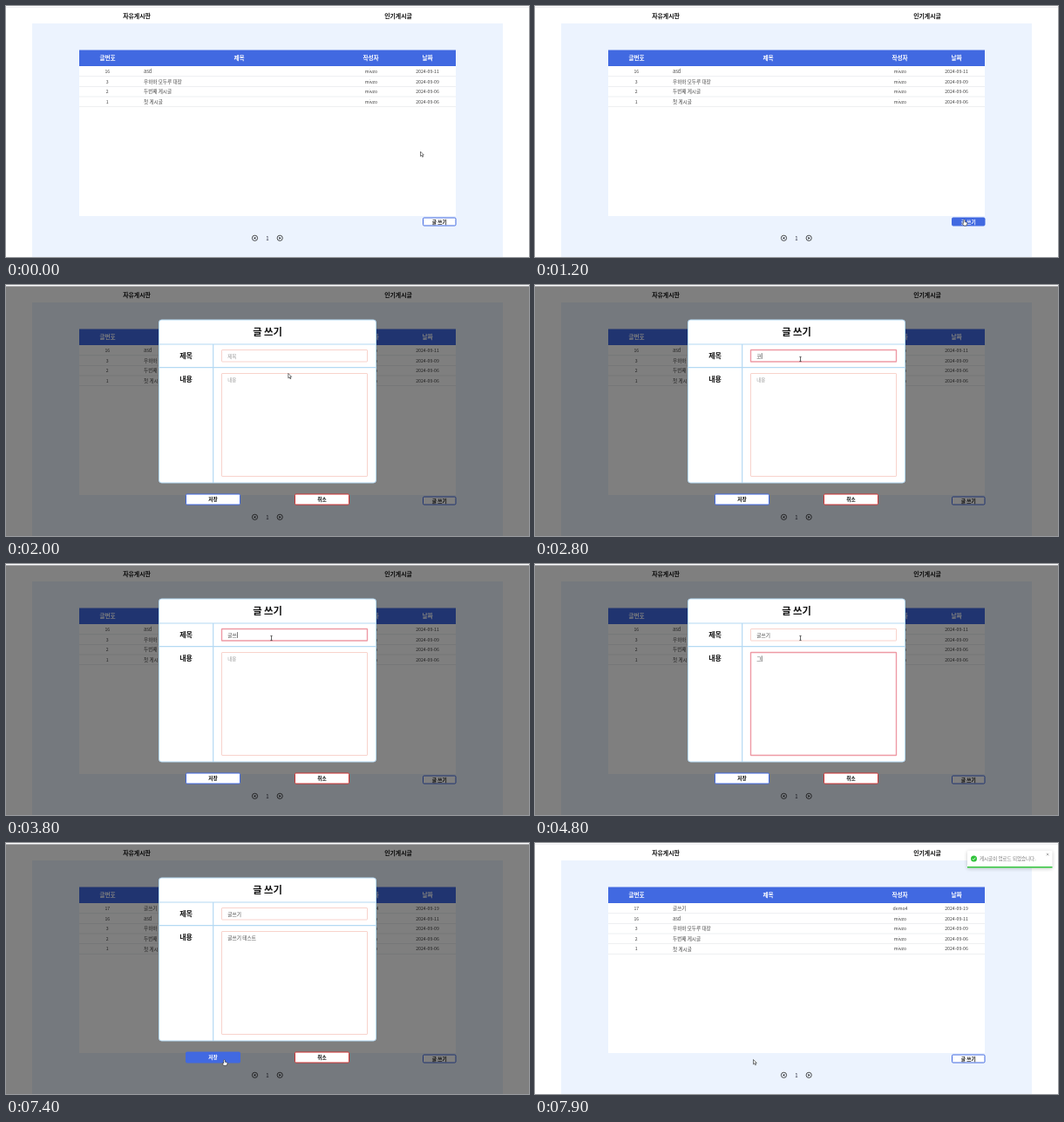
An HTML page with a canvas that plays this animation: 600 px wide and 288 px high, repeating every 8 s.

```html
<!DOCTYPE html>
<html lang="ko">
<head>
<meta charset="utf-8">
<style>
  html, body { margin: 0; width: 100%; height: 100%; overflow: hidden; background: #fff; }
  canvas { display: block; width: 600px; height: 288px; }
</style>
</head>
<body>
<canvas id="stage"></canvas>
<script>
const LOOP = 8000, OPEN = 1300, SAVED = 7400, CLOSE = 7500;
const BLUE = '#4169e1', RULE = '#b4d9f3';
const canvas = document.getElementById('stage');
const c = canvas.getContext('2d');
const ratio = window.devicePixelRatio || 1;
canvas.width = 600 * ratio;
canvas.height = 288 * ratio;

const posts = [
  ['17', '글쓰기', 'demo4', '2024-09-19'],
  ['16', 'asd', 'mivzo', '2024-09-11'],
  ['3', '우하하 모두루 대장', 'mivzo', '2024-09-09'],
  ['2', '두번째 게시글', 'mivzo', '2024-09-06'],
  ['1', '첫 게시글', 'mivzo', '2024-09-06']
];

// [time, text]: each keystroke of the two fields
const titleKeys = [[2300, ''], [2700, '코'], [3100, ''], [3300, '그'], [3450, '글'],
  [3650, '글쓰'], [3900, '글쓰기']];
const bodyKeys = [[4400, ''], [4700, 'ㄱ'], [4800, '그'], [4950, '글'], [5150, '글쓰'], [5350, '글쓰기'],
  [5550, '글쓰기 '], [5700, '글쓰기 테'], [5900, '글쓰기 테스'], [6100, '글쓰기 테스트']];

// [time, x, y]: pointer stops
const pointerPath = [[0, 475.5, 167], [100, 490, 240], [200, 490, 240], [300, 492.5, 245],
  [1400, 492.5, 245], [2150, 304.5, 85], [6500, 304.5, 85], [7100, 250.5, 248.5], [LOOP, 250.5, 248.5]];

const field = { x: 247.5, y: 74.5, w: 167, h: 13.5 };
const area = { x: 247.5, y: 101.5, w: 167, h: 118 };
const writeButton = { x: 478.5, y: 243, w: 37.5, h: 9 };
const saveButton = { x: 206.5, y: 240, w: 62, h: 12 };
const cancelButton = { x: 331.5, y: 240, w: 62, h: 12 };

const clamp = v => Math.max(0, Math.min(1, v));
const ease = v => v * v * (3 - 2 * v);
const inside = (p, b) => p.x >= b.x && p.x <= b.x + b.w && p.y >= b.y && p.y <= b.y + b.h;

function rect(x, y, w, h, fill) {
  c.fillStyle = fill;
  c.fillRect(x, y, w, h);
}

function box(b, radius, fill, stroke, width = 1) {
  c.beginPath();
  c.roundRect(b.x, b.y, b.w, b.h, radius);
  c.fillStyle = fill;
  c.fill();
  if (!stroke) return;
  c.strokeStyle = stroke;
  c.lineWidth = width;
  c.stroke();
}

function line(points, color, width) {
  c.beginPath();
  points.forEach(([x, y]) => c.lineTo(x, y));
  c.strokeStyle = color;
  c.lineWidth = width;
  c.stroke();
}

function text(str, x, y, size, color = '#222', weight = 400, align = 'center') {
  c.font = `${weight} ${size}px "Noto Sans CJK KR", "Noto Sans CJK", "Noto Sans", sans-serif`;
  c.textAlign = align;
  c.textBaseline = 'middle';
  c.fillStyle = color;
  c.fillText(str, x, y);
  return c.measureText(str).width;
}

function button(b, label, color, hover) {
  box(b, 1.2, hover ? color : '#fff', color);
  text(label, b.x + b.w / 2, b.y + b.h / 2, 5.7, hover ? '#fff' : '#111', 700);
}

function pointerAt(t) {
  const i = pointerPath.findIndex(p => p[0] > t);
  const [t0, x0, y0] = pointerPath[i - 1], [t1, x1, y1] = pointerPath[i];
  const k = ease((t - t0) / (t1 - t0));
  return { x: x0 + (x1 - x0) * k, y: y0 + (y1 - y0) * k };
}

function drawPage(t, pointer) {
  rect(0, 0, 600, 288, '#fff');
  rect(0, 1, 600, 0.7, '#e9e9ec');
  rect(30, 20, 540, 268, '#ecf3fe');
  text('자유게시판', 150, 11, 6.9, '#111', 600);
  text('인기게시글', 450, 11, 6.9, '#111', 600);

  rect(84, 50.5, 432, 190.5, '#fff');
  rect(84, 50.5, 432, 18.5, BLUE);
  [['글번호', 116.5], ['제목', 267.5], ['작성자', 418.5], ['날짜', 483.5]]
    .forEach(([label, x]) => text(label, x, 59.7, 6.6, '#fff', 700));

  posts.slice(t < SAVED ? 1 : 0).forEach(([id, title, author, date], i) => {
    const y = 75 + i * 11.6;
    text(id, 116.3, y, 5.2, '#444');
    text(title, 158, y, 5.6, '#444', 400, 'left');
    text(author, 419, y, 5.2, '#444');
    text(date, 483.5, y, 5.2, '#444');
    rect(84, y + 5.5, 432, 0.6, '#e2e4e8');
  });

  const hover = t >= 300 && t < OPEN && inside(pointer, writeButton);
  button(writeButton, '글 쓰기', BLUE, hover);

  [[285.5, -1], [314.2, 1]].forEach(([x, dir]) => {
    c.beginPath();
    c.arc(x, 266.3, 3.1, 0, Math.PI * 2);
    c.strokeStyle = '#222';
    c.lineWidth = 0.8;
    c.stroke();
    c.beginPath();
    [[1.5, 0], [-0.8, -1.4], [-0.8, 1.4]].forEach(([dx, dy]) => c.lineTo(x + dx * dir, 266.3 + dy));
    c.fillStyle = '#222';
    c.fill();
  });
  text('1', 300, 266.5, 6, '#223');
}

function drawInput(b, y, placeholder, keys, t, focused) {
  box(b, 0.5, '#fff', focused ? '#ee9aa5' : '#f8d3cc', focused ? 1.4 : 1);
  const key = keys.filter(k => k[0] <= t).pop();
  const value = key ? key[1] : '';
  const width = value ? text(value, 254.3, y, 5.7, '#444', 400, 'left') : 0;
  if (!value) text(placeholder, 254.3, y, 5.5, '#999', 400, 'left');
  if (focused && (t - key[0]) % 1060 < 530) rect(254.6 + width, y - 3.4, 0.6, 6.8, '#222');
}

function drawModal(t, pointer) {
  rect(0, 1.5, 600, 286.5, 'rgba(0,0,0,0.5)');
  box({ x: 175.5, y: 40, w: 249, h: 187 }, 3, '#fff', RULE);
  text('글 쓰기', 300, 54, 11.3, '#111', 700);
  line([[175.5, 68], [424.5, 68]], RULE, 1.2);
  line([[175.5, 94.7], [424.5, 94.7]], RULE, 1.2);
  line([[237.7, 68], [237.7, 227]], RULE, 1.2);
  text('제목', 206.5, 81, 8, '#111', 700);
  text('내용', 206.5, 108, 8, '#111', 700);
  drawInput(field, 81.5, '제목', titleKeys, t, t >= 2300 && t < 4400);
  drawInput(area, 108.7, '내용', bodyKeys, t, t >= 4400 && t < 7300);
  button(saveButton, '저장', BLUE, inside(pointer, saveButton));
  button(cancelButton, '취소', '#cf3333', false);
}

function drawToast(t) {
  const k = 1 - clamp((t - CLOSE) / 300);
  c.save();
  c.translate(110 * k * k * k, 0);
  c.shadowColor = 'rgba(0,0,0,0.22)';
  c.shadowBlur = 4 * ratio;
  c.shadowOffsetY = ratio;
  box({ x: 496, y: 8.8, w: 97.5, h: 19.7 }, 1.3, '#fff');
  c.shadowColor = 'transparent';
  rect(496, 27, 97.5, 1.5, '#2fc33a');
  c.beginPath();
  c.arc(503.5, 18.1, 3.5, 0, Math.PI * 2);
  c.fillStyle = '#2fc33a';
  c.fill();
  line([[501.8, 18.2], [503, 19.4], [505.3, 16.8]], '#fff', 0.8);
  text('게시글이 업로드 되었습니다.', 510, 18.3, 5.5, '#777', 400, 'left');
  line([[586.8, 11.8], [589.4, 14.4]], '#777', 0.6);
  line([[589.4, 11.8], [586.8, 14.4]], '#777', 0.6);
  c.restore();
}

function drawPointer(t, { x, y }, modal) {
  const p = { x, y };
  const overButton = modal
    ? inside(p, saveButton) || t < 1400
    : t >= 300 && t < OPEN && inside(p, writeButton);
  c.save();
  c.translate(x, y);
  if (modal && (inside(p, field) || inside(p, area))) {
    line([[-1.2, -2.6], [1.2, -2.6]], '#222', 0.6);
    line([[0, -2.6], [0, 2.6]], '#222', 0.7);
    line([[-1.2, 2.6], [1.2, 2.6]], '#222', 0.6);
  } else {
    const shape = overButton
      ? 'M-.8 .6Q0-.5 .8 .6V2.7L3 3.3Q3.6 3.6 3.4 4.7L2.6 7H-.6L-2.4 4.5Q-2.3 3.5-.8 4.4Z'
      : 'M0 0V5.4L1.3 4.3 2.2 6.3 3.1 5.9 2.2 3.9H3.8Z';
    const path = new Path2D(shape);
    c.fillStyle = '#fff';
    c.fill(path);
    c.strokeStyle = '#222';
    c.lineWidth = 0.6;
    c.stroke(path);
  }
  c.restore();
}

function draw(now) {
  const t = now % LOOP;
  const pointer = pointerAt(t);
  const modal = t >= OPEN && t < CLOSE;
  c.setTransform(ratio, 0, 0, ratio, 0, 0);
  drawPage(t, pointer);
  if (modal) drawModal(t, pointer);
  if (t >= CLOSE) drawToast(t);
  drawPointer(t, pointer, modal);
}

const start = performance.now();
function tick() {
  draw(performance.now() - start);
  requestAnimationFrame(tick);
}
tick();
</script>
</body>
</html>
```
